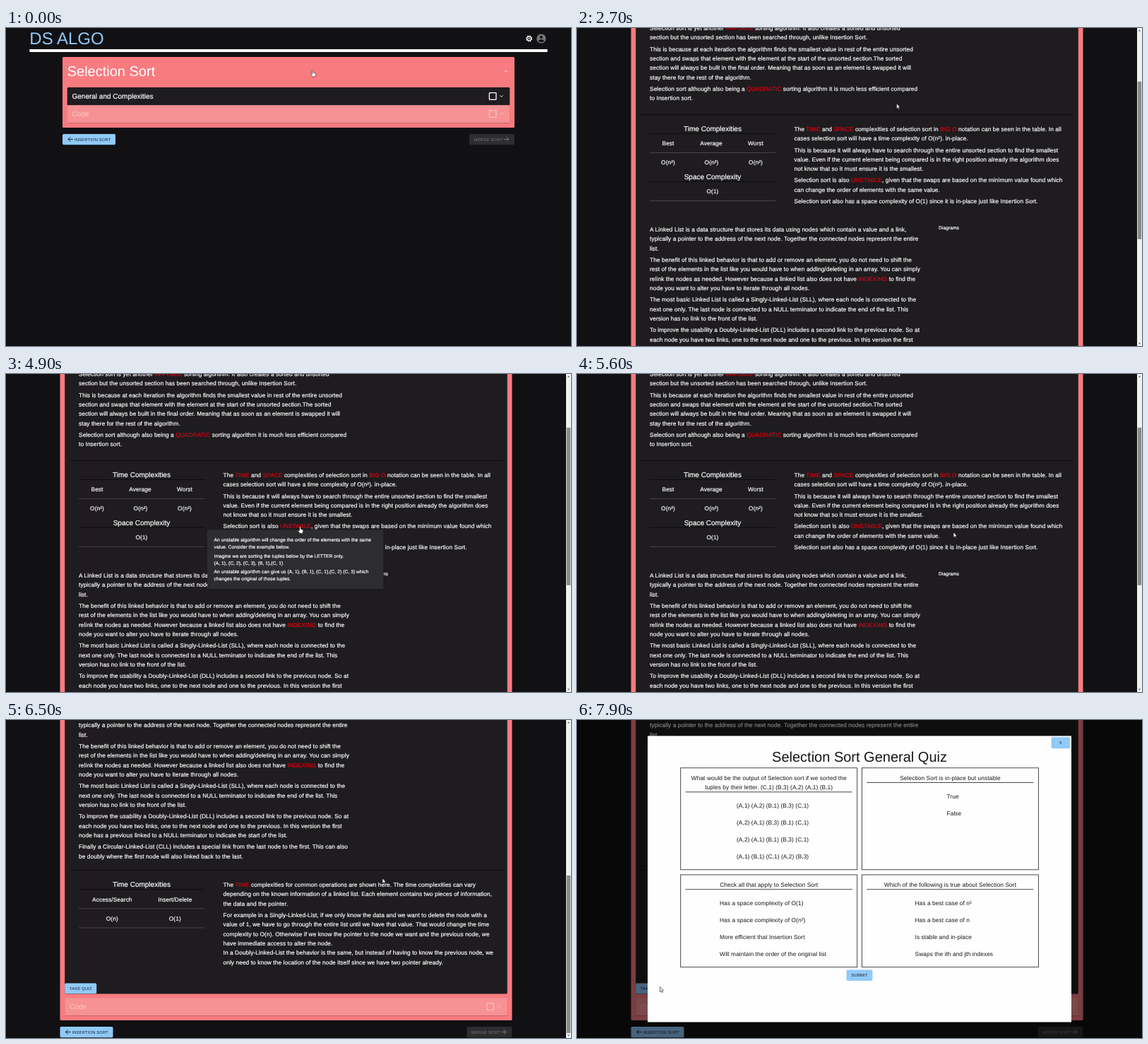
Animation of 800x450 px, one loop 8000 ms. Source, as an HTML page:

```html
<!DOCTYPE html>
<html lang="en">
<head>
<meta charset="utf-8">
<title>Selection Sort</title>
<style>
  html, body { margin: 0; width: 100%; height: 100%; overflow: hidden; background: #111013; }
  svg { display: block; width: 100vw; height: 100vh; }
  text { font: 8.333px "Liberation Sans", Arial, sans-serif; letter-spacing: .0094em; fill: #fff; stroke: #fff; stroke-width: .2; text-rendering: geometricPrecision; white-space: pre; }
  .h1 { font-size: 24px; letter-spacing: 0; fill: #90caf9; stroke: none; }
  .h3 { font-size: 20px; letter-spacing: 0; stroke: none; }
  .h5 { font-size: 10px; letter-spacing: 0; }
  .small { font-size: 6.667px; }
  .btn { font-size: 5.833px; letter-spacing: .167px; fill: #1a242c; stroke: none; }
  .mid { text-anchor: middle; }
  .red { fill: #dc0010; stroke: #dc0010; }
  .quiz text:not(.btn) { fill: #151515; stroke: none; }
  .quiz .box { fill: none; stroke: #333; stroke-width: .9; }
</style>
</head>
<body>
<svg id="stage" viewBox="0 0 800 450"></svg>
<script>
const LINE = 13.333;
const $ = id => document.getElementById(id);

// ---- markup helpers ----
const rect = (x, y, w, h, fill, more = "") =>
  `<rect x="${x}" y="${y}" width="${w}" height="${h}" fill="${fill}" ${more}/>`;
const text = (x, y, s, cls = "") =>
  `<text x="${x}" y="${y}" class="${cls}">${s.replace(/\*(.+?)\*/g, '<tspan class="red">$1</tspan>')}</text>`;
const lines = (x, y, s, cls, step = LINE) =>
  s.split("\n").map((l, i) => text(x, y + i * step, l, cls)).join("");
const rule = (x1, x2, y, color, w = .9) =>
  `<path d="M${x1} ${y}H${x2}" stroke="${color}" stroke-width="${w}"/>`;
const button = (x, y, w, h, label, tx, ty, id = "") =>
  rect(x, y, w, h, "#90caf9", `rx="1.7" id="${id}"`) + text(tx, ty, label, "btn");
const chevron = (x, y, up, id = "") =>
  `<path id="${id}" d="M${x - 2} ${y + up}l2 ${-2 * up}l2 ${2 * up}" fill="none" stroke="#fff"/>`;
const checkbox = (x, y) =>
  rect(x - 4.8, y - 4.8, 9.6, 9.6, "none", 'rx=".6" stroke="#fff" stroke-width="1.3"');
const arrow = (x, y, dir, color) =>
  `<path d="M${x - 3.5} ${y}h7m${dir > 0 ? -3.3 : -7 + 3.3} -3.3l${3.3 * dir} 3.3l${-3.3 * dir} 3.3" fill="none" stroke="${color}"/>`;

// rows: lists of [x, label]
function table(y, rows) {
  return text(192, y + 3.5, "Time Complexities", "h5 mid") + rule(103, 281, y + 7, "#0c0b0d") +
    rows.map((row, i) => row.map(([x, s]) => text(x, y + 23.7 + i * 27, s, "mid")).join("")).join("") +
    rule(103, 281, y + 34, "#4a494c");
}

const content =
  rule(83.2, 709.8, 115.5, "#0c0b0d") +
  lines(103, 142, "Selection sort is yet another *IN-PLACE* sorting algorithm. It also creates a sorted and unsorted\nsection but the unsorted section has been searched through, unlike Insertion Sort.") +
  lines(103, 171.7, "This is because at each iteration the algorithm finds the smallest value in rest of the entire unsorted\nsection and swaps that element with the element at the start of the unsorted section.The sorted\nsection will always be built in the final order. Meaning that as soon as an element is swapped it will\nstay there for the rest of the algorithm.") +
  lines(103, 228, "Selection sort although also being a *QUADRATIC* sorting algorithm it is much less efficient compared\nto Insertion sort.") +
  rule(90, 703, 261.6, "#0c0b0d") +
  table(281.5, [[[129, "Best"], [190, "Average"], [253, "Worst"]], [[129, "O(n²)"], [190.5, "O(n²)"], [253, "O(n²)"]]]) +
  text(192, 352.8, "Space Complexity", "h5 mid") + rule(103, 281, 356.4, "#0c0b0d") +
  text(192, 372.8, "O(1)", "mid") + rule(103, 281, 383.5, "#4a494c") +
  lines(307.5, 285, "The *TIME* and *SPACE* complexities of selection sort in *BIG O* notation can be seen in the table. In all\ncases selection sort will have a time complexity of O(n²). in-place.") +
  lines(307.5, 314.5, "This is because it will always have to search through the entire unsorted section to find the smallest\nvalue. Even if the current element being compared is in the right position already the algorithm does\nnot know that so it must ensure it is the smallest.") +
  lines(307.5, 357.4, "Selection sort is also *UNSTABLE*, given that the swaps are based on the minimum value found which\ncan change the order of elements with the same value.") +
  text(307.5, 387, "Selection sort also has a space complexity of O(1) since it is in-place just like Insertion Sort.") +
  lines(103, 427, "A Linked List is a data structure that stores its data using nodes which contain a value and a link,\ntypically a pointer to the address of the next node. Together the connected nodes represent the entire\nlist.") +
  lines(103, 470, "The benefit of this linked behavior is that to add or remove an element, you do not need to shift the\nrest of the elements in the list like you would have to when adding/deleting in an array. You can simply\nrelink the nodes as needed. However because a linked list also does not have *INDEXING* to find the\nnode you want to alter you have to iterate through all nodes.") +
  lines(103, 526.3, "The most basic Linked List is called a Singly-Linked-List (SLL), where each node is connected to the\nnext one only. The last node is connected to a NULL terminator to indicate the end of the list. This\nversion has no link to the front of the list.") +
  lines(103, 569.3, "To improve the usability a Doubly-Linked-List (DLL) includes a second link to the previous node. So at\neach node you have two links, one to the next node and one to the previous. In this version the first\nnode has a previous linked to a NULL terminator to indicate the start of the list.") +
  lines(103, 612.3, "Finally a Circular-Linked-List (CLL) includes a special link from the last node to the first. This can also\nbe doubly where the first node will also linked back to the last.") +
  text(512, 424.4, "Diagrams", "small") +
  rule(90, 703, 642.4, "#0c0b0d") +
  table(662.8, [[[150.3, "Access/Search"], [239.3, "Insert/Delete"]], [[150.3, "O(n)"], [239.3, "O(1)"]]]) +
  rule(103, 281, 724, "#4a494c") +
  lines(307.5, 666, "The *TIME* complexities for common operations are shown here. The time complexities can vary\ndepending on the known information of a linked list. Each element contains two pieces of information,\nthe data and the pointer.") +
  lines(307.5, 709, "For example in a Singly-Linked-List, if we only know the data and we want to delete the node with a\nvalue of 1, we have to go through the entire list until we have that value. That would change the time\ncomplexity to O(n). Otherwise if we know the pointer to the node we want and the previous node, we\nhave immediate access to alter the node.\nIn a Doubly-Linked-List the behavior is the same, but instead of having to know the previous node, we\nonly need to know the location of the node itself since we have two pointer already.") +
  button(83.2, 802.6, 45, 15, "TAKE QUIZ", 89.8, 812.2, "take");

const header =
  text(0, 23, "DS ALGO", "h1") + rect(0, 30, 733.3, 4, "#fff", 'id="bar"') +
  `<g id="icons"><g transform="translate(-26 15)" fill="none" stroke="#fff">
    <circle r="3.9" stroke-width="1.2" stroke-dasharray="1.73 1.333"/><circle r="2.9" stroke-width="1.3"/><circle r="1.1" fill="#fff" stroke="none"/></g>
  <g transform="translate(-8.8 15)"><circle r="6.6" fill="#757575"/>
    <circle cy="-2" r="2" fill="#111013"/><path d="M-4 3.4C-3.4.6 3.4.6 4 3.4Q0 6.4-4 3.4" fill="#111013"/></g></g>`;

const page =
  `<g id="header">${header}</g><g id="body">` +
  rect(76.5, 41, 640, 100, "#f87b80", 'id="card" rx="1.5"') +
  text(83.2, 67.5, "Selection Sort", "h3") + chevron(704.7, 61, 1) +
  rect(83.2, 84, 626.6, 25.5, "#1e1c1f", 'id="panel" rx="1.5"') +
  `<g id="summary">${text(90, 100, "General and Complexities", "h5")}${checkbox(685.7, 96.5)}
    ${chevron(698, 96.5, -1, "down")}${chevron(698, 96.5, 1, "up")}</g>
  <g clip-path="url(#fold)"><g id="content">${content}</g></g>
  <g id="foot">${rect(83.2, 109.5, 626.6, 25.6, "#b9565a", 'rx="1.5"')}${rect(83.2, 109.3, 626.6, 25, "#f69294", 'rx="1.5"')}
    <g opacity=".4">${text(90, 124.8, "Code", "h5")}${checkbox(685.7, 121.5)}${chevron(698, 121.5, -1)}</g>
    ${button(76.5, 150, 75, 15.2, "INSERTION SORT", 93.4, 159.5)}${arrow(88, 157.5, -1, "#1a242c")}
    ${rect(652.5, 150, 64, 15.2, "#2d2c2f", 'rx="1.7"')}<g opacity=".36">
    <text x="659" y="159.5" class="btn" style="fill:#fff">MERGE SORT</text>${arrow(704.8, 157.5, 1, "#fff")}</g>
  </g></g>`;

const tooltip = rect(285.5, 222, 250, 84, "#000", 'rx="2" opacity=".25"') +
  rect(285, 220.4, 249.6, 84, "#2d2c2f", 'rx="1.7"') +
  lines(294.5, 237.3, "An unstable algorithm will change the order of the elements with the same\nvalue. Consider the example below.", "small", 10) +
  lines(294.5, 259.8, "Imagine we are sorting the tuples below by the LETTER only.\n(A, 1), (C, 2), (C, 3), (B, 1),(C, 1)", "small", 10) +
  lines(294.5, 282, "An unstable algorithm can give us (A, 1), (B, 1), (C, 1),(C, 2) (C, 3) which\nchanges the original of those tuples.", "small", 10);

// one quiz card: question (centred) above a rule, then answers
function card(x, y, h, question, ax, answers) {
  const n = question.split("\n").length, under = y + 7.4 + n * LINE;
  return `<rect class="box" x="${x}" y="${y}" width="250" height="${h}"/>` +
    lines(x + 125, y + 16.7, question, "mid") + rule(x + 7, x + 243, under, "#333") +
    lines(ax, under + 22, answers, "", 24.1);
}
const quiz = rect(100, 22.5, 600, 405, "#fefefe") +
  button(671.6, 24.3, 26.4, 16, "X", 682.8, 34.3) +
  text(400, 59.3, "Selection Sort General Quiz", "h3 mid") +
  card(146.7, 67.8, 144, "What would be the output of Selection sort if we sorted the\ntuples by their letter. (C,1) (B,3) (A,2) (A,1) (B,1)", 226, "(A,1) (A,2) (B,1) (B,3) (C,1)\n(A,2) (A,1) (B,3) (B,1) (C,1)\n(A,2) (A,1) (B,1) (B,3) (C,1)\n(A,1) (B,1) (C,1) (A,2) (B,3)") +
  card(403.4, 67.8, 144, "Selection Sort is in-place but unstable", 523.5, "True\nFalse") +
  card(146.7, 219, 130.7, "Check all that apply to Selection Sort", 202, "Has a space complexity of O(1)\nHas a space complexity of O(n²)\nMore efficient that Insertion Sort\nWill maintain the order of the original list") +
  card(403.4, 219, 130.7, "Which of the following is true about Selection Sort", 478.5, "Has a best case of n²\nHas a best case of n\nIs stable and in-place\nSwaps the ith and jth indexes") +
  button(381.6, 353.4, 36.8, 15.6, "SUBMIT", 388.5, 363.2);

$("stage").innerHTML =
  `<defs><clipPath id="fold"><rect id="foldBox" x="76" y="109" width="640" height="0"/></clipPath></defs>
  <g id="page">${page}</g>
  <g id="scrollbar">${rect(793, 0, 7, 450, "#f1f1f1")}${rect(793.8, 7, 5.4, 223, "#8a8a8a", 'id="thumb"')}
    <path d="M795 4.6l1.5-2l1.5 2zM795 445.4l1.5 2l1.5-2z" fill="#505050"/></g>
  <g id="tip">${tooltip}</g>
  <g id="quiz" class="quiz">${rect(0, 0, 800, 450, "#000", 'id="shade"')}${quiz}</g>
  <g id="cursor" fill="#fff" stroke="#111" stroke-width=".6">
    <path id="hand" d="M-.9.6Q0-.7.9.6V3.6L3.5 4.3Q4.4 4.7 4.3 5.8L3.6 9.4H-.6L-3 6Q-2.7 4.6-.9 5.8Z"/>
    <path id="pointer" d="M0 0V7.2L1.7 5.7L2.8 8.2L3.9 7.7L2.8 5.3H5Z"/></g>`;

// ---- motion ----
const part = (t, a, b) => Math.min(1, Math.max(0, (t - a) / (b - a)));
const smooth = u => u * u * (3 - 2 * u);
const easeOut = u => 1 - (1 - u) ** 3;
const set = (id, name, value) => $(id).setAttribute(name, value);
const show = (id, on) => set(id, "display", on ? "inline" : "none");
const move = (id, x, y) => set(id, "transform", `translate(${x} ${y})`);

// start, end, x, y
const start = [434.5, 59.5];
const moves = [
  [100, 700, 452, 94.5], [2000, 2500, 452.5, 107], [2900, 3600, 416.5, 216],
  [5200, 5600, 533, 224], [6500, 7300, 117.5, 377.5]
];

function draw(t) {
  const open = smooth(part(t, 850, 1300));
  const scroll = 139 * easeOut(part(t, 2000, 2600)) + 291 * easeOut(part(t, 5650, 6345));
  const long = 166 + 714 * open > 450, modal = t >= 7700;
  const width = long ? 793 : 800, panel = 25.5 + 708 * open;

  move("page", 0, -scroll);
  move("header", width / 24, 0);
  set("bar", "width", width * 11 / 12);
  move("icons", width * 11 / 12, 0);
  move("body", long ? 0 : 3.5, 0);
  set("card", "height", 100 + 714 * open);
  set("panel", "height", panel);
  set("foldBox", "height", Math.max(0, panel - 25));
  move("summary", 0, 3.2 * open);
  move("content", 0, 6.67 * (open - 1));
  move("foot", 0, 714 * open);
  show("up", open > .5);
  show("down", open <= .5);
  set("take", "fill", t >= 7200 && !modal ? "#559fd9" : "#90caf9");

  show("scrollbar", long && !modal);
  set("thumb", "y", 7 + 213 * scroll / 430);
  set("tip", "opacity", part(t, 3600, 3800) - part(t, 5200, 5400));
  show("quiz", modal);
  set("shade", "opacity", .5 * part(t, 7650, 7875));

  let [x, y] = start;
  for (const [a, b, nx, ny] of moves) {
    const u = smooth(part(t, a, b));
    x += (nx - x) * u;
    y += (ny - y) * u;
  }
  move("cursor", x, y);
  const hand = t < 2100 || (t >= 3500 && t < 5300) || (t >= 7200 && !modal);
  show("hand", hand);
  show("pointer", !hand);
}

const begin = performance.now();
function tick() {
  draw(Math.floor((performance.now() - begin) % 8000 / 100) * 100);
  requestAnimationFrame(tick);
}
tick();
</script>
</body>
</html>
```
